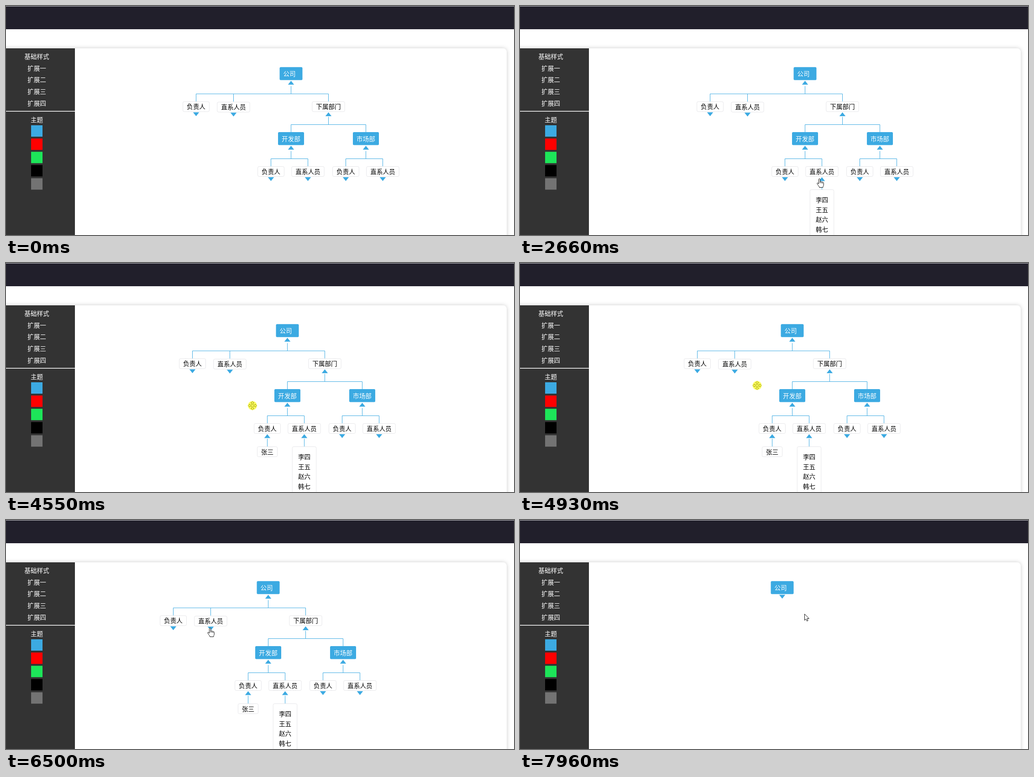
These frames come from a looping animation (1113x503 px, 8 s). An HTML page:

```html
<!DOCTYPE html>
<html lang="zh-CN">
<head>
<meta charset="utf-8">
<title>组织结构图</title>
<style>
html, body { margin: 0; width: 100%; height: 100%; overflow: hidden; background: #fff; }
svg { display: block; width: 100%; height: 100%; }
text { font: 13.6px "Noto Sans CJK SC", "Noto Sans CJK", "Noto Sans", sans-serif; text-anchor: middle; }
.panel { filter: drop-shadow(0 0 5px rgba(0, 0, 0, .2)); }
.cursor path { fill: #fff; stroke: #111; stroke-linejoin: round; }
</style>
</head>
<body>
<svg viewBox="0 0 1113 503">
  <rect width="1113" height="51" fill="#211f2b"/>
  <rect width="1113" height="1" fill="#c8c8cc"/>
  <path class="panel" fill="#fff" d="M-20 93H1089a8 8 0 0 1 8 8V530H-20Z"/>
  <g id="side"></g>
  <g id="tree"></g>
  <g id="pointer" class="cursor">
    <path id="arrow" d="M.5 .5V14.3L3.6 11.4L5.6 16L8 15L6 10.5H10.3Z"/>
    <path id="hand" d="M-1.5 1.6C-1.5 0 1.5 0 1.5 1.6V7C2 6 4.2 6.2 4.2 7.6C5 6.7 6.8 7 6.8 8.4C7.7 7.6 9.2 8.2 9.2 9.6V14C9.2 16 7.7 17 7.7 19.5H-.2C-.2 17.5-2 16.3-3 14.5L-5 11.2C-5.6 9.8-4 9-3 10L-1.5 11.7ZM1.5 7V10M4.2 8V10.4M6.8 9V11"/>
    <path id="move" stroke-width=".95" d="M0-9.5L3.6-5.8H1.3V-1.3H5.8V-3.6L9.5 0L5.8 3.6V1.3H1.3V5.8H3.6L0 9.5L-3.6 5.8H-1.3V1.3H-5.8V3.6L-9.5 0L-5.8-3.6V-1.3H-1.3V-5.8H-3.6Z"/>
    <circle id="press" r="10" fill="#ff0" opacity=".6"/>
  </g>
</svg>
<script>
const LOOP = 8000, BLUE = '#3caae2';
const $ = id => document.getElementById(id);
const people = ['李四', '王五', '赵六', '韩七', '钱八'];

const label = (x, y, s, fill) => `<text x="${x}" y="${y + 5}" fill="${fill}">${s}</text>`;
const rect = (x, y, w, h, fill) => `<rect x="${x}" y="${y}" width="${w}" height="${h}" fill="${fill}"/>`;
const line = d => `<path d="${d}" fill="none" stroke="${BLUE}"/>`;
const card = (cx, y, w, h) =>
  `<rect x="${cx - w / 2}" y="${y}" width="${w}" height="${h}" rx="3" fill="#fff" stroke="#e6e6e9"/>`;
const leaf = (cx, y, s) => card(cx, y + .5, s.length * 13.6 + 17, 22) + label(cx, y + 11.5, s, '#000');
const dept = (cx, y, w, s, dx = 0) =>
  `<rect x="${cx - w / 2}" y="${y}" width="${w}" height="28.5" rx="2.5" fill="${BLUE}"/>` + label(cx + dx, y + 14.5, s, '#fff');
const toggle = (cx, y, open) =>
  `<path fill="${BLUE}" d="M${cx - 6.7} ${open ? y + 8.5 : y}h13.4l-6.7 ${open ? -8.5 : 8.5}z"/>`;

// stem from y down to a bar, then drops to each child
const branch = (cx, y, xs) =>
  line(`M${cx} ${y}v17M${xs[0]} ${y + 17}H${xs[xs.length - 1]}` + xs.map(x => `M${x} ${y + 17}v17`).join(''));

const staff = (cx, y) => line(`M${cx} ${y}v17`) + card(cx, y + 17.5, 52.5, 130) +
  people.map((s, i) => label(cx, y + 40 + i * 21.6, s, '#000')).join('');

function team(cx, name, headOpen, staffOpen) {
  const a = cx - 44, b = cx + 37;
  return dept(cx, 277, 57, name) + toggle(cx, 307, true) + branch(cx, 318.5, [a, b]) +
    leaf(a, 352, '负责人') + leaf(b, 352, '直系人员') +
    toggle(a, 376, headOpen) + toggle(b, 376, staffOpen) +
    (headOpen ? line(`M${a} 386v17`) + leaf(a, 403, '张三') : '') +
    (staffOpen ? staff(b, 386) : '');
}

function tree({ root, top, head, crew }) {
  const cx = 624.5;
  let s = dept(cx, 134.3, 50, '公司', -3.5) + toggle(cx, 164.3, root);
  if (!root) return s;
  s += branch(cx, 176, [416.5, 498.5, 706.5]) +
    leaf(416.5, 209.5, '负责人') + leaf(498.5, 210.5, '直系人员') + leaf(706.5, 209.5, '下属部门') +
    toggle(416.5, 233.5, false) + toggle(498.5, 234.3, top) + toggle(706.5, 233.5, true) +
    branch(706.5, 243.5, [cx, 788.5]) + team(cx, '开发部', head, crew) + team(788.5, '市场部', false, false);
  return s + (top ? staff(498.5, 244) : '');
}

$('side').innerHTML = rect(0, 93, 151, 410, '#333') + rect(0, 230.5, 151, 1.5, '#fff') +
  ['基础样式', '扩展一', '扩展二', '扩展三', '扩展四'].map((s, i) => label(67.5, 110.8 + i * 25.8, s, '#fff')).join('') +
  label(67.5, 249.8, '主题', '#fff') +
  [BLUE, '#f00', '#1de559', '#000', '#737373'].map((c, i) => rect(55, 262 + i * 29.1, 25, 25, c)).join('');

// pointer track: time, x, y, shape from that time on
const track = [
  [310, 1014, 487, 'arrow'], [550, 890, 437, 'arrow'], [640, 845, 418, 'move'], [1070, 715, 385, 'move'],
  [1170, 703, 387, 'move'], [1220, 703, 387, 'move'], [1550, 667, 381, 'hand'], [1910, 655, 376, 'hand'],
  [2040, 655, 376, 'hand'], [2400, 656, 379, 'hand'], [2700, 656, 379, 'hand'], [2770, 630, 386, 'move'],
  [2830, 610, 389, 'move'], [2960, 598, 386, 'move'], [3040, 590, 381, 'hand'], [3240, 586, 379, 'hand'],
  [3440, 586, 379, 'hand'], [3770, 628, 374, 'hand'], [3870, 628, 374, 'hand'], [3960, 604, 366, 'hand'],
  [4020, 590, 346, 'move'], [4210, 549, 331, 'move'], [4250, 548, 331, 'move'], [4400, 548, 331, 'move'],
  [4930, 519.5, 269, 'move'], [4990, 519.5, 269, 'move'], [5110, 498, 258, 'move'], [5220, 514, 260, 'move'],
  [5740, 455, 242, 'hand'], [5980, 447, 237, 'hand'], [6530, 447, 237, 'hand'], [6590, 466, 232, 'move'],
  [6980, 570, 178, 'hand'], [7110, 574, 173, 'hand'], [7390, 574, 173, 'hand'], [7480, 582, 179, 'arrow'],
  [7960, 623, 206, 'arrow']
];
const presses = [[1910, 2040], [3240, 3440], [4250, 5110], [5980, 6040], [6350, 6400], [7110, 7390]];

function pointerAt(t) {
  let i = track.findIndex(k => k[0] > t);
  if (i < 0) i = track.length;
  const a = track[i - 1], b = track[i] || a;
  const u = b === a ? 0 : (t - a[0]) / (b[0] - a[0]);
  return { x: a[1] + (b[1] - a[1]) * u, y: a[2] + (b[2] - a[2]) * u, shape: a[3] };
}

let drawn = '';
function render(t) {
  const state = { root: t < 7390, top: t >= 6040 && t < 6400, head: t >= 3440, crew: t >= 2040 };
  const key = JSON.stringify(state);
  if (key !== drawn) {
    $('tree').innerHTML = tree(state);
    drawn = key;
  }
  const shown = t >= track[0][0];
  $('pointer').style.display = shown ? '' : 'none';
  let shift = 0;
  if (shown) {
    const { x, y, shape } = pointerAt(t);
    $('pointer').setAttribute('transform', `translate(${x.toFixed(1)} ${y.toFixed(1)})`);
    for (const id of ['arrow', 'hand', 'move']) $(id).style.display = id === shape ? '' : 'none';
    $('press').style.display = presses.some(([a, b]) => t >= a && t < b) ? '' : 'none';
    if (t >= 4400) shift = t < 5110 ? Math.round(x - 548) : -50;
  }
  $('tree').setAttribute('transform', `translate(${shift} 0)`);
}

const start = performance.now();
function tick() {
  render((performance.now() - start) % LOOP);
  requestAnimationFrame(tick);
}
tick();
</script>
</body>
</html>
```
